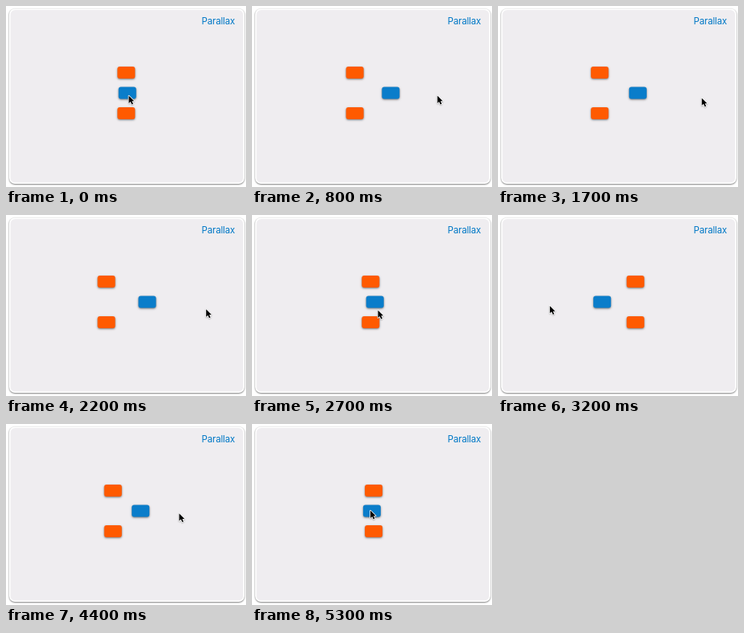
An HTML page with a canvas that plays this animation: 300 by 227 pixels, repeating every 5.4 s.

```html
<!DOCTYPE html>
<html lang="en">
<head>
<meta charset="utf-8">
<title>Parallax</title>
<style>
  html, body { margin: 0; width: 100%; height: 100%; overflow: hidden; background: #fff; }
  canvas { display: block; width: 300px; height: 227px; }
</style>
</head>
<body>
<canvas id="stage"></canvas>
<script>
const LOOP = 5400, STEP = 100, LAG = 18;
const CENTER = { x: 151, y: 109 }, ROW_GAP = 25.4;
const POINTER_REST = 150, DEPTH = 0.25;
const ORANGE = '#ff5a00', BLUE = '#0a7dca';

// Turning points of the pointer as [time, position]
const sweep = [
  [0, 153], [600, 258], [700, 258], [1150, 29], [1300, 29],
  [1800, 278], [3600, 36], [3900, 266], [5100, 131]
];
const drift = [[0, 112], [900, 112], [2700, 119], [3800, 106], [4500, 112], [5300, 108]];

const canvas = document.getElementById('stage');
const ctx = canvas.getContext('2d');
const ratio = window.devicePixelRatio || 1;
canvas.width = Math.round(300 * ratio);
canvas.height = Math.round(227 * ratio);
ctx.scale(ratio, ratio);

const ease = u => (1 - Math.cos(Math.PI * u)) / 2;

function position(track, time) {
  const t = (time + LOOP) % LOOP;
  const i = track.findLastIndex(([at]) => at <= t);
  const [t0, from] = track[i];
  const [t1, to] = track[i + 1] || [LOOP, track[0][1]];
  return from + (to - from) * ease((t - t0) / (t1 - t0));
}

function shadow(alpha, blur, y) {
  ctx.shadowColor = `rgba(0,0,0,${alpha})`;
  ctx.shadowBlur = blur * ratio;
  ctx.shadowOffsetY = y * ratio;
}

function roundBox(x, y, w, h, radius, color) {
  ctx.fillStyle = color;
  ctx.beginPath();
  ctx.roundRect(x, y, w, h, radius);
  ctx.fill();
}

function block(row, shift) {
  ctx.save();
  shadow(0.5, 2.5, 1);
  const x = CENTER.x + (row ? -shift : shift);
  const y = CENTER.y + row * ROW_GAP;
  roundBox(x - 11, y - 7.5, 22, 15, 3, row ? ORANGE : BLUE);
  ctx.restore();
}

// White-rimmed panel
function card() {
  ctx.save();
  shadow(0.6, 2, 0.8);
  roundBox(4, 3.5, 294, 219.5, 7, '#fff');
  ctx.restore();
  roundBox(5.5, 5, 291, 216.5, 6, '#efedf0');
}

function label() {
  ctx.font = '400 11.5px Inter, sans-serif';
  ctx.letterSpacing = '-0.15px';
  ctx.fillStyle = '#0078c6';
  ctx.fillText('Parallax', 244.5, 22.8);
}

const arrowShape = new Path2D('M0 0V9.4L2.2 7.4 3.8 10.9 5.4 10.2 3.9 6.8H6.7Z');

function arrow(x, y) {
  ctx.save();
  ctx.translate(x + 0.5, y + 0.5);
  shadow(0.3, 1.5, 0.7);
  ctx.lineWidth = 1.6;
  ctx.lineJoin = 'round';
  ctx.strokeStyle = '#fff';
  ctx.stroke(arrowShape);
  ctx.shadowColor = 'transparent';
  ctx.fillStyle = '#000';
  ctx.fill(arrowShape);
  ctx.restore();
}

function draw(now) {
  const t = Math.floor((now % LOOP) / STEP) * STEP;
  const shift = (position(sweep, t - LAG) - POINTER_REST) * DEPTH;
  ctx.fillStyle = '#fff';
  ctx.fillRect(0, 0, 300, 227);
  card();
  label();
  for (const row of [-1, 0, 1]) block(row, shift);
  arrow(position(sweep, t), position(drift, t));
}

const start = performance.now();
function tick() {
  draw(performance.now() - start);
  requestAnimationFrame(tick);
}
tick();
</script>
</body>
</html>
```
